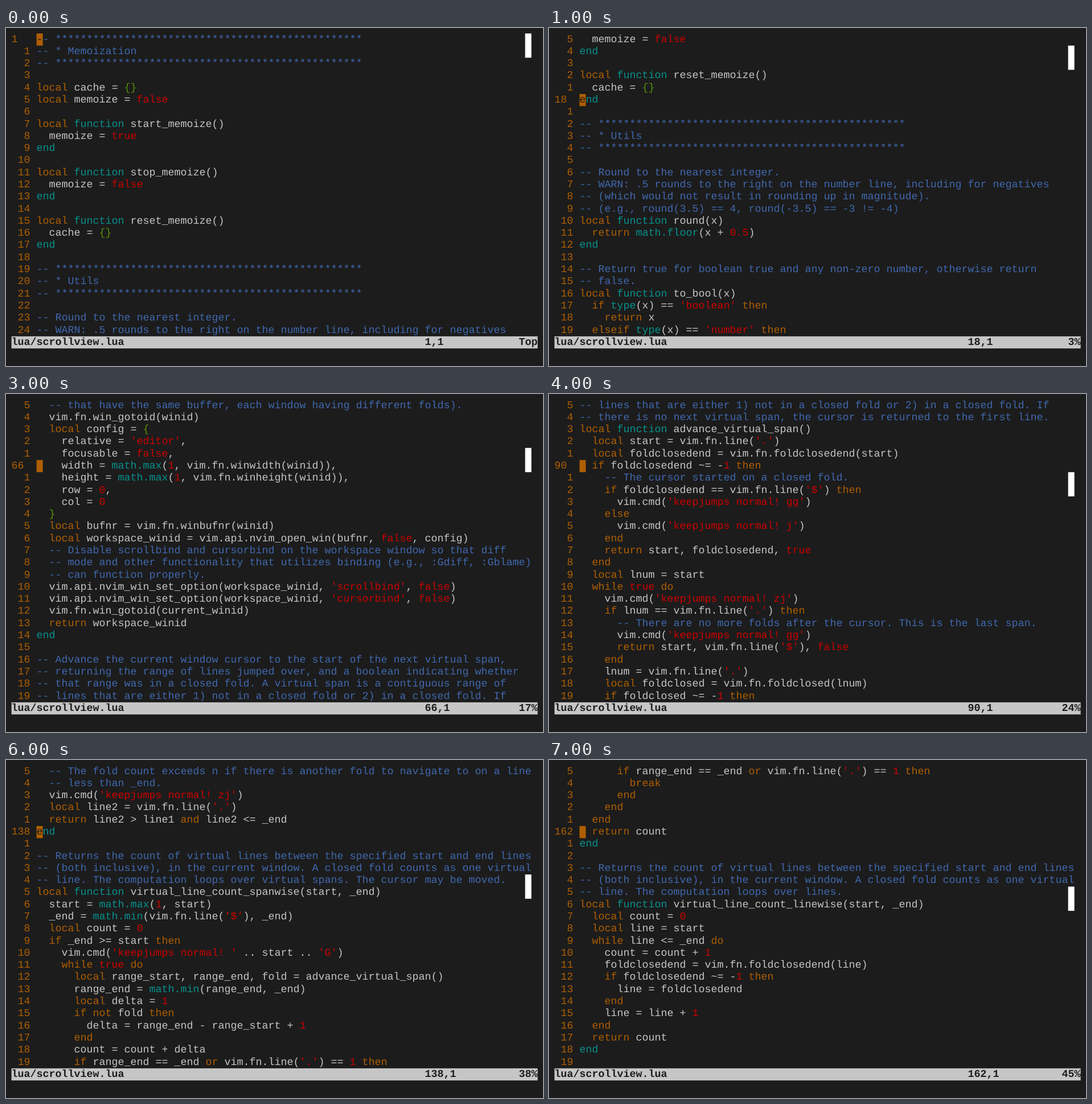
Animation of 943x594 px, one loop 8000 ms. Source, as an HTML page:

```html
<!DOCTYPE html>
<html lang="en">
<head>
<meta charset="utf-8">
<title>Scrolling editor</title>
<style>
  :root { --bg: #1c1c1c; --fg: #c6c6c6; --brown: #af5f00; }
  html, body { margin: 0; width: 100%; height: 100%; overflow: hidden; background: var(--bg); }
  svg { position: absolute; left: 0; top: 0; width: 943px; height: 594px; visibility: hidden; animation: page 8s step-end infinite; }
  @keyframes page {
    0% { visibility: visible; }
    12.5%, 100% { visibility: hidden; }
  }
  text {
    font: 18.33px "Liberation Mono", monospace; fill: var(--fg);
    white-space: pre; text-rendering: geometricPrecision; font-variant-ligatures: none;
  }
  .bar { fill: #fff; }
  .cursor { fill: var(--brown); }
  .status { fill: var(--fg); }
  .dark { fill: var(--bg); }
  .bold { font-weight: bold; }
  .c { fill: #4068ae; }
  .r { fill: #cc0000; }
  .k { fill: var(--brown); }
  .t { fill: #06928e; }
  .g { fill: #569206; }
</style>
</head>
<body>
<script>
const rule = '-- ' + '*'.repeat(49);
const lines = `${rule}
-- * Memoization
${rule}

local cache = {}
local memoize = false

local function start_memoize()
  memoize = true
end

local function stop_memoize()
  memoize = false
end

local function reset_memoize()
  cache = {}
end

${rule}
-- * Utils
${rule}

-- Round to the nearest integer.
-- WARN: .5 rounds to the right on the number line, including for negatives
-- (which would not result in rounding up in magnitude).
-- (e.g., round(3.5) == 4, round(-3.5) == -3 != -4)
local function round(x)
  return math.floor(x + 0.5)
end

-- Return true for boolean true and any non-zero number, otherwise return
-- false.
local function to_bool(x)
  if type(x) == 'boolean' then
    return x
  elseif type(x) == 'number' then
    return x ~= 0
  end
  return false
end

${rule}
-- * Core
${rule}

-- Creates a temporary floating window that can be used for computations
-- ---corresponding to the specified window---that require temporary cursor
-- movements (e.g., counting virtual lines, where all lines in a closed fold
-- are counted as a single line). This can be used instead of working in the
-- actual window, to prevent unintended side-effects that arise from moving the
-- cursor in the actual window, even when autocmd's are disabled with
-- eventignore=all and the cursor is restored (e.g., Issue #18: window
-- flickering when resizing with the mouse, Issue #19: cursorbind/scrollbind
-- out-of-sync). It's the caller's responsibility to close the workspace
-- window.
local function open_win_workspace(winid)
  local current_winid = vim.fn.win_getid(vim.fn.winnr())
  -- Make the target window active, so that its folds are inherited by the
  -- created floating window (this is necessary when there are multiple windows
  -- that have the same buffer, each window having different folds).
  vim.fn.win_gotoid(winid)
  local config = {
    relative = 'editor',
    focusable = false,
    width = math.max(1, vim.fn.winwidth(winid)),
    height = math.max(1, vim.fn.winheight(winid)),
    row = 0,
    col = 0
  }
  local bufnr = vim.fn.winbufnr(winid)
  local workspace_winid = vim.api.nvim_open_win(bufnr, false, config)
  -- Disable scrollbind and cursorbind on the workspace window so that diff
  -- mode and other functionality that utilizes binding (e.g., :Gdiff, :Gblame)
  -- can function properly.
  vim.api.nvim_win_set_option(workspace_winid, 'scrollbind', false)
  vim.api.nvim_win_set_option(workspace_winid, 'cursorbind', false)
  vim.fn.win_gotoid(current_winid)
  return workspace_winid
end

-- Advance the current window cursor to the start of the next virtual span,
-- returning the range of lines jumped over, and a boolean indicating whether
-- that range was in a closed fold. A virtual span is a contiguous range of
-- lines that are either 1) not in a closed fold or 2) in a closed fold. If
-- there is no next virtual span, the cursor is returned to the first line.
local function advance_virtual_span()
  local start = vim.fn.line('.')
  local foldclosedend = vim.fn.foldclosedend(start)
  if foldclosedend ~= -1 then
    -- The cursor started on a closed fold.
    if foldclosedend == vim.fn.line('$') then
      vim.cmd('keepjumps normal! gg')
    else
      vim.cmd('keepjumps normal! j')
    end
    return start, foldclosedend, true
  end
  local lnum = start
  while true do
    vim.cmd('keepjumps normal! zj')
    if lnum == vim.fn.line('.') then
      -- There are no more folds after the cursor. This is the last span.
      vim.cmd('keepjumps normal! gg')
      return start, vim.fn.line('$'), false
    end
    lnum = vim.fn.line('.')
    local foldclosed = vim.fn.foldclosed(lnum)
    if foldclosed ~= -1 then
      -- The cursor moved to a closed fold. The preceding line ends the prior
      -- virtual span.
      return start, lnum - 1, false
    end
  end
end

-- Returns a boolean indicating whether the count of folds (closed folds count
-- as a single fold) between the specified start and end lines exceeds 'n', in
-- the current window. The cursor may be moved.
local function fold_count_exceeds(start, _end, n)
  vim.cmd('keepjumps normal! ' .. start .. 'G')
  if vim.fn.foldclosed(start) ~= -1 then
    n = n - 1
  end
  if n < 0 then
    return true
  end
  -- Navigate down n folds.
  if n > 0 then
    vim.cmd('keepjumps normal! ' .. n .. 'zj')
  end
  local line1 = vim.fn.line('.')
  -- The fold count exceeds n if there is another fold to navigate to on a line
  -- less than _end.
  vim.cmd('keepjumps normal! zj')
  local line2 = vim.fn.line('.')
  return line2 > line1 and line2 <= _end
end

-- Returns the count of virtual lines between the specified start and end lines
-- (both inclusive), in the current window. A closed fold counts as one virtual
-- line. The computation loops over virtual spans. The cursor may be moved.
local function virtual_line_count_spanwise(start, _end)
  start = math.max(1, start)
  _end = math.min(vim.fn.line('$'), _end)
  local count = 0
  if _end >= start then
    vim.cmd('keepjumps normal! ' .. start .. 'G')
    while true do
      local range_start, range_end, fold = advance_virtual_span()
      range_end = math.min(range_end, _end)
      local delta = 1
      if not fold then
        delta = range_end - range_start + 1
      end
      count = count + delta
      if range_end == _end or vim.fn.line('.') == 1 then
        break
      end
    end
  end
  return count
end

-- Returns the count of virtual lines between the specified start and end lines
-- (both inclusive), in the current window. A closed fold counts as one virtual
-- line. The computation loops over lines.
local function virtual_line_count_linewise(start, _end)
  local count = 0
  local line = start
  while line <= _end do
    count = count + 1
    foldclosedend = vim.fn.foldclosedend(line)
    if foldclosedend ~= -1 then
      line = foldclosedend
    end
    line = line + 1
  end
  return count
end
`.split('\n');

const ROWS = 25, HIDDEN = 342;
const MARGIN = 9.6, CELL = 11, ROW = 21.29, ASCENT = 14.95;

// Each group of the pattern maps to one colour class.
const token = new RegExp([
  "(--.*)",
  "('[^']*'|\\b\\d+(?:\\.\\d+)?\\b|\\b(?:true|false)\\b)",
  "(^end\\b|\\bfunction\\b|\\bmath\\.\\w+|\\btype(?=\\())",
  "(\\b(?:local|return|if|then|elseif|else|end|while|do|break|and|or|not)\\b)",
  "([{}]+)"
].join('|'), 'g');

const span = (cls, text) => `<tspan class="${cls}">${text}</tspan>`;

const highlight = line => line.replace(/</g, '&lt;').replace(token,
  (text, ...groups) => span('crtkg'[groups.slice(0, 5).findIndex(Boolean)], text));

const x = col => MARGIN + col * CELL;
const y = row => MARGIN + row * ROW;

const text = (col, row, content, cls = '') =>
  `<text class="${cls}" x="${x(col)}" y="${y(row) + ASCENT}">${content}</text>`;

const block = (cls, col, row, cols, rows) =>
  `<rect class="${cls}" x="${x(col)}" y="${y(row)}" width="${cols * CELL}" height="${rows * ROW}"/>`;

function page(top, i) {
  const cursor = top === 1 ? 1 : top + 5;
  const code = lines.slice(top - 1, top - 1 + ROWS).map((line, r) => {
    const dist = Math.abs(top + r - cursor);
    const num = dist ? String(dist).padStart(3) : String(cursor).padEnd(3);
    return text(0, r, span('k', num) + ' ' + highlight(line));
  }).join('');

  const scrolled = (top - 1) / HIDDEN;
  const barRow = Math.round(scrolled * (ROWS - 2));
  const first = lines[cursor - 1][0] || '';
  const pos = `${cursor},${first ? '1' : '0-1'}`;
  const percent = top === 1 ? 'Top' : String(Math.floor(scrolled * 100)).padStart(2) + '%';
  const status = 'lua/scrollview.lua'.padEnd(66) + pos.padEnd(15) + percent;

  return `<svg viewBox="0 0 943 594" style="animation-delay:${i - 8}s">
    ${code}
    ${block('cursor', 4, cursor - top, 1, 1)}
    ${text(4, cursor - top, first, 'dark')}
    ${block('bar', 82, barRow, 1, 2)}
    ${block('status', 0, ROWS, 84, 1)}
    ${text(0, ROWS, status, 'dark bold')}
  </svg>`;
}

// The view moves half a page once, then a full page every second.
const tops = Array.from({ length: 8 }, (_, i) => i ? 24 * i - 11 : 1);
document.body.innerHTML = tops.map(page).join('');
</script>
</body>
</html>
```
